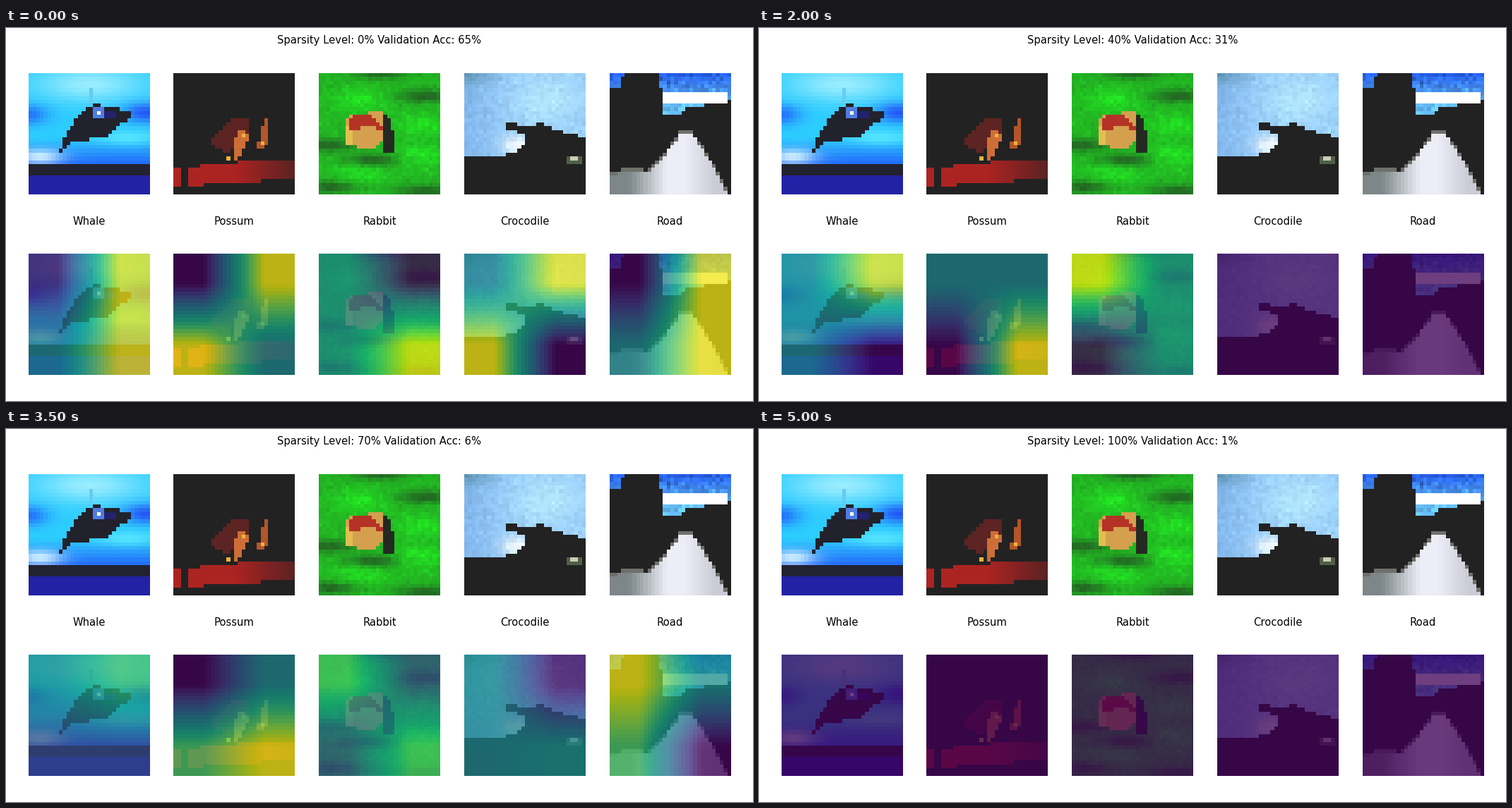
A matplotlib script for the animation above (5.5 s loop, 1058x529 px).

```python
import numpy as np
import matplotlib.pyplot as plt
from matplotlib.animation import FuncAnimation
from matplotlib.path import Path

W, H, DPI = 1058, 529, 128
N, SIZE, PITCH = 32, 172, 205.75
FONT_SIZE = W / DPI
HEAT_ALPHA = 0.78

BLACK, WHITE = (34, 34, 34), (255, 255, 255)
NAVY, BLUE, CYAN = (34, 34, 165), (34, 105, 250), (45, 205, 255)
PALE, RED, TAN, GOLD = (165, 240, 255), (172, 36, 34), (205, 110, 55), (225, 190, 80)

plt.rcParams["font.family"] = "DejaVu Sans"
rng = np.random.default_rng(7)
Y, X = np.mgrid[0:N, 0:N] + 0.5
CENTRES = np.column_stack([X.ravel(), Y.ravel()])


def ramp(coord, start, end, first, last):
    """Colour gradient along a coordinate."""
    t = np.clip((coord - start) / (end - start), 0, 1)[..., None]
    return np.array(first) + t * (np.array(last) - first)


def canvas(color=BLACK):
    return ramp(Y, 0, N, color, color)


def poly(img, points, color):
    mask = Path(points).contains_points(CENTRES).reshape(N, N)
    img[mask] = color[mask] if np.ndim(color) == 3 else color


def box(img, x, y, w, h, color):
    img[y:y + h, x:x + w] = color


def glow(img, cx, cy, rx, ry, color, strength=0.9):
    a = strength * np.exp(-((X - cx) / rx) ** 2 - ((Y - cy) / ry) ** 2)
    img += a[..., None] * (np.array(color) - img)


def grain(img, amount):
    img *= 1 + amount * rng.standard_normal((N, N, 1))


def whale():
    img = ramp(Y, 17, 24, CYAN, BLUE)
    glow(img, 16, 3, 14, 4.5, PALE)
    glow(img, 0, 11, 5, 2.6, BLUE)
    glow(img, 31, 10.5, 6, 2.6, (35, 75, 245))
    glow(img, 26, 17, 8, 2, (90, 230, 255))
    glow(img, 3, 22, 6, 2, (225, 250, 255))
    box(img, 0, 24, N, 3, (34, 34, 48))
    box(img, 0, 27, N, 5, NAVY)
    poly(img, [(8, 21.6), (9.9, 16), (14, 10), (17.3, 8.2), (27, 10), (27, 11.4),
               (20, 17), (12, 18)], (34, 34, 44))
    box(img, 20, 10, 3, 2, (34, 34, 110))
    box(img, 17, 9, 3, 3, (80, 125, 225))
    box(img, 18, 10, 1, 1, WHITE)
    box(img, 16, 4, 1, 4, (100, 205, 240))
    return img


def possum():
    img = canvas()
    poly(img, [(0, 25), (14, 24), (20, 23), (32, 22.8), (32, 27.6), (20, 28.8), (0, 30)],
         ramp(X, 16, N, RED, (92, 34, 34)))
    box(img, 2, 25, 2, 5, BLACK)
    poly(img, [(9, 18), (16, 12), (20, 12), (20.3, 17), (14, 21)], (92, 36, 34))
    poly(img, [(16, 23), (16, 18), (18, 14.5), (20, 17), (17, 23)], TAN)
    poly(img, [(22, 20), (24, 12), (25.5, 11), (25, 19)], (180, 85, 42))
    for x, y in [(18, 16), (14, 22), (23, 18)]:
        box(img, x, y, 1, 1, (235, 180, 60))
    return img


def rabbit():
    img = canvas((34, 182, 34))
    for cx, cy in [(11, 7), (27, 14), (27, 22), (11, 26)]:
        glow(img, cx, cy, 7, 3, (34, 228, 34))
    for cx, cy in [(16, 0), (28, 6), (3, 19), (14, 23), (3, 30), (28, 31)]:
        glow(img, cx, cy, 7, 1.6, (34, 75, 34), 0.75)
    grain(img, 0.04)
    poly(img, [(7, 13), (9, 11), (17, 10), (18, 12), (17, 18), (14, 20), (7, 19)],
         (212, 160, 78))
    box(img, 7, 14, 2, 5, GOLD)
    poly(img, [(8, 13), (10, 11), (14, 11), (17, 15), (13, 14), (8, 15)], (180, 50, 38))
    poly(img, [(17, 11), (18.2, 11), (20, 16), (20, 21), (17, 21)], (36, 42, 34))
    return img


def crocodile():
    img = ramp(X, 0, 14, (132, 184, 238), (155, 208, 250))
    glow(img, 22, 7, 8, 6, (182, 232, 255))
    glow(img, 0, 0, 7, 3, (95, 150, 180))
    glow(img, 14, 19, 4, 2.5, WHITE)
    grain(img, 0.025)
    poly(img, [(0, 22.5), (8, 22), (13, 21.2), (16, 19), (16.6, 17), (14, 15.5),
               (10.4, 14.1), (11.3, 12.9), (17, 14), (20.7, 12.9), (23.5, 15),
               (32, 17), (32, 32), (0, 32)], BLACK)
    box(img, 27, 22, 4, 2, (80, 95, 70))
    box(img, 28, 22, 2, 1, (200, 205, 180))
    return img


def road():
    img = canvas()
    sky = ramp(Y, 0, 8, (34, 90, 235), (105, 195, 255))
    grain(sky, 0.1)
    poly(img, [(13, 0), (32, 0), (32, 7), (20, 9.5), (18, 11.2), (14.5, 11.2)], sky)
    poly(img, [(0, 0), (4, 0), (2.5, 4), (0, 4.5)], sky)
    box(img, 14, 5, 17, 3, WHITE)
    edge = np.array([(18.5, 16), (21.5, 16), (24.5, 20), (29.2, 28), (31, 32), (0, 32),
                     (0, 27), (5, 25.8), (9.5, 26.3), (13, 23.5), (17, 18.7)])
    poly(img, edge - (0, 0.8), (110, 112, 106))
    poly(img, edge, ramp(X, 5, 15, (125, 134, 136), (236, 237, 246))
         - ramp(X, 20, 28, (0, 0, 0), (34, 34, 34)))
    return img


# One string per key level, corners in the order top-left, top-right,
# bottom-left, bottom-right: "+" hot, "." lukewarm, "-" cold.
HEAT = {"+": 0.98, ".": 0.46, "-": 0.02}
KEY_LEVELS = [0, 20, 40, 50, 60, 80, 100]
KEY_ACCURACY = [65, 49, 31, 20, 11, 1, 1]
PANELS = [
    ("Whale", whale, "-+.+ -+-+ .+.- --+. -+.- +.-. ----"),
    ("Possum", possum, "-++. +-.- ..-+ +-.- -..+ -.++ ----"),
    ("Rabbit", rabbit, ".-.+ +-.+ +.-. ---- +-.. ..-+ ----"),
    ("Crocodile", crocodile, ".++- ++.- ---- +..- --.+ +-.- ----"),
    ("Road", road, "-+.+ -+++ ---- .+-. +-.- +++- ----"),
]

blend = np.clip((np.arange(N) + 0.5 - 8) / 16, 0, 1)
weights = np.stack([1 - blend, blend], axis=1)
cell = ((np.arange(SIZE) + 0.5) * N / SIZE).astype(int)
viridis = plt.get_cmap("viridis")


def heatmap(keys, level):
    """Corner heats at a sparsity level, spread bilinearly over the grid."""
    corners = [np.interp(level, KEY_LEVELS, [HEAT[mark] for mark in marks])
               for marks in zip(*keys)]
    return weights @ np.reshape(corners, (2, 2)) @ weights.T


def enlarge(img):
    return img[np.ix_(cell, cell)]


fig = plt.figure(figsize=(W / DPI, H / DPI), dpi=DPI, facecolor="white")
title = fig.text(0.5, 1 - 9.6 / H, "", fontsize=FONT_SIZE, ha="center", va="top")


def show(left, top, img):
    return fig.figimage(enlarge(img), left, H - top - SIZE, origin="upper")


overlays = []
for i, (name, paint, keys) in enumerate(PANELS):
    centre = W / 2 + PITCH * (i - 2)
    left = int(centre - SIZE / 2 + 0.5)
    picture = np.clip(paint(), 34, 255)
    raw = (picture - 34) / 221
    show(left, 64, picture / 255)
    fig.text(centre / W, 1 - 279.3 / H, name, fontsize=FONT_SIZE,
             ha="center", va="baseline")
    overlays.append((show(left, 320, raw), raw, keys.split()))


def update(step):
    level = 10 * step
    accuracy = np.interp(level, KEY_LEVELS, KEY_ACCURACY)
    title.set_text(f"Sparsity Level: {level}% Validation Acc: {accuracy:.0f}%")
    for artist, raw, keys in overlays:
        heat = viridis(heatmap(keys, level))[..., :3]
        artist.set_data(enlarge(HEAT_ALPHA * heat + (1 - HEAT_ALPHA) * raw))
    return [title] + [artist for artist, _, _ in overlays]


anim = FuncAnimation(fig, update, frames=11, interval=500,
                     repeat=True, repeat_delay=0, blit=False)
plt.show()
```
